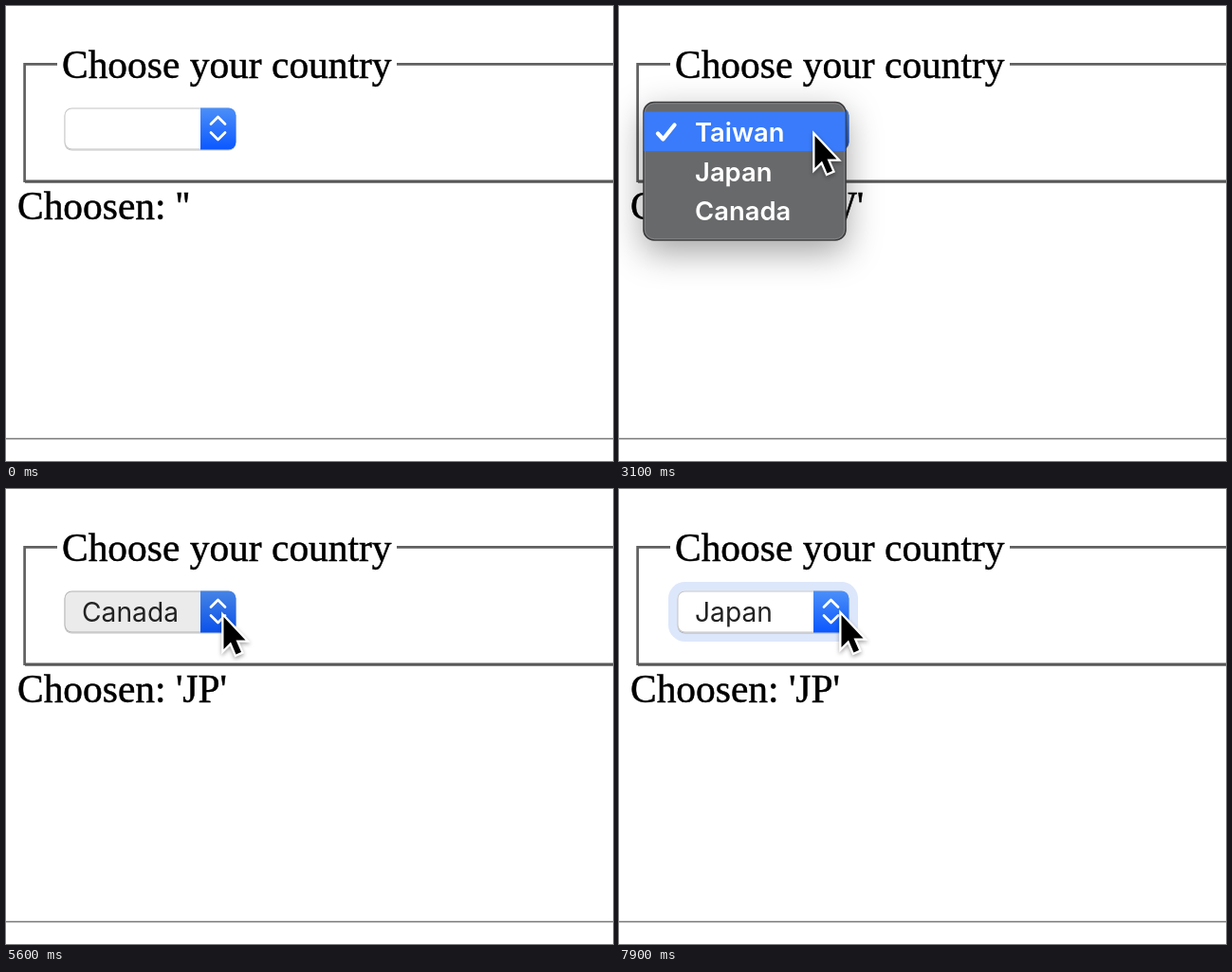
These frames come from a looping animation (640x480 px, 8000 ms). An HTML page:

```html
<!DOCTYPE html>
<html lang="en">
<head>
<meta charset="utf-8">
<title>Choose your country</title>
<style>
html, body { margin: 0; width: 100%; height: 100%; overflow: hidden; background: #fff; }
svg { display: block; width: 640px; height: 480px; }
.page { font: 41.45px "Liberation Serif", "Times New Roman", serif; }
.page text { stroke: #000; stroke-width: .5px; }
.ui { font: 28.2px Inter, "Open Sans", sans-serif; }
#menu { font-weight: 600; font-size: 27.4px; fill: #fff; filter: drop-shadow(0 12px 18px rgba(0, 0, 0, .36)); }
.line { fill: none; stroke-linecap: round; stroke-linejoin: round; }
</style>
</head>
<body>
<svg viewBox="0 0 640 480">
  <defs>
    <linearGradient id="blue" x1="0" y1="0" x2="0" y2="1">
      <stop offset="0" stop-color="#4d90f8"/>
      <stop offset="1" stop-color="#0a57ff"/>
    </linearGradient>
    <clipPath id="view"><rect y="24" width="640" height="456"/></clipPath>
    <clipPath id="box"><rect x="61.5" y="107.5" width="181" height="44" rx="8"/></clipPath>
  </defs>

  <g class="page">
    <path d="M54 61.3H19.6V186" fill="none" stroke="#606060" stroke-width="2.7"/>
    <path d="M412 61.3H640" stroke="#606060" stroke-width="2.7"/>
    <path d="M20 185.1H640" stroke="#585858" stroke-width="3.4"/>
    <path d="M0 456.5H640" stroke="#777" stroke-width="1.3"/>
    <text x="59" y="75.8">Choose your country</text>
    <text x="12" y="225.3" id="chosen"></text>
  </g>

  <g class="ui">
    <rect id="ring"/>
    <rect x="61.5" y="108.5" width="181" height="44" rx="8" fill="#000" opacity=".22"/>
    <g clip-path="url(#box)">
      <rect x="61" y="107" width="182" height="45" fill="#fff"/>
      <rect x="61.5" y="107.5" width="181" height="44" rx="8" fill="none" stroke="#c4c4c4" stroke-width="2"/>
      <rect x="205" y="107" width="38" height="45" fill="url(#blue)"/>
      <rect id="press" x="61" y="107" width="182" height="45" opacity=".08"/>
    </g>
    <path class="line" d="M216 124.5L223.5 117L231 124.5M216 133.5L223.5 141L231 133.5" stroke="#fff" stroke-width="2.7"/>
    <text x="80" y="139.5" id="value" fill="#222"></text>
  </g>

  <g clip-path="url(#view)">
    <g id="menu" class="ui">
      <rect x=".5" y=".5" width="213" height="145.5" rx="11" fill="#68696b" stroke="#3b3b3d" stroke-width="1.6"/>
      <rect x="1.8" y="1.8" width="210.4" height="142.9" rx="10" fill="none" stroke="#838486"/>
      <rect id="hover" x="1" width="212" height="41.5" fill="#397bfa"/>
      <path id="check" class="line" d="M15.5 33.5L21 39.5L33 24.5" stroke="#fff" stroke-width="4.3"/>
    </g>
  </g>

  <g id="cursor" style="filter: drop-shadow(0 2px 2px rgba(0, 0, 0, .35))">
    <path d="M2.5 6V40L10 32.5L15.5 45.5L21 43L15.5 30.5H25.5Z" fill="#000" stroke="#fff" stroke-width="4.6"
      stroke-linejoin="miter" paint-order="stroke"/>
  </g>
</svg>
<script>
const $ = id => document.getElementById(id);
const countries = ["Taiwan", "Japan", "Canada"], codes = ["TW", "JP", "CA"];
const ROW = 41.5, PAD = 10.6, LOOP = 8000, STEP = 100;
const FADE = 200, COMMIT = 300;

// Each visit to the menu: when it opens, when an item is clicked, which item.
const visits = [
  { open: 1300, click: 2200, pick: 0 },
  { open: 3000, click: 4000, pick: 1 },
  { open: 4500, click: 5400, pick: 2 },
  { open: 6200, click: 7600, pick: 1 }
];

// Pointer path: time, x, y
const path = [
  [400, 521, 274], [600, 420, 195], [800, 300, 120], [900, 245, 96], [1100, 200, 112],
  [1300, 212, 128], [1700, 198, 160], [2100, 204, 131], [3400, 204, 131], [3900, 190, 169],
  [4050, 192, 168], [4500, 224, 121], [4600, 224, 121], [5000, 198, 165], [5400, 194, 172],
  [5600, 227, 129], [6000, 225, 117], [6400, 225, 117], [7100, 198, 83], [7300, 200, 86],
  [7600, 201, 87], [7900, 232, 127]
];

countries.forEach((name, i) => {
  const label = document.createElementNS("http://www.w3.org/2000/svg", "text");
  label.setAttribute("x", 54.5);
  label.setAttribute("y", 42 + i * ROW);
  label.textContent = name;
  $("menu").append(label);
});

function set(id, attrs) {
  for (const k in attrs) $(id).setAttribute(k, attrs[k]);
}

function show(id, on) {
  $(id).style.display = on ? "" : "none";
}

function pointer(t) {
  const i = path.findIndex(p => p[0] > t);
  if (i < 0) return path[path.length - 1].slice(1);
  if (!i) return path[0].slice(1);
  const [t0, x0, y0] = path[i - 1], [t1, x1, y1] = path[i];
  const u = (t - t0) / (t1 - t0);
  return [x0 + (x1 - x0) * u, y0 + (y1 - y0) * u];
}

function draw(t) {
  const [x, y] = pointer(t);
  show("cursor", t >= path[0][0]);
  set("cursor", { transform: `translate(${x} ${y})` });

  const done = visits.filter(v => t >= v.click + COMMIT).pop();
  const closed = visits.filter(v => t >= v.click + FADE).pop();
  const busy = visits.find(v => t >= v.open && t < v.click + COMMIT);
  $("chosen").textContent = `Choosen: '${done ? codes[done.pick] : ""}'`;
  $("value").textContent = closed ? countries[closed.pick] : "";
  show("press", busy);

  show("ring", done && !busy);
  if (done) {
    const fresh = t < done.click + COMMIT + STEP, pad = fresh ? 9.5 : 6;
    set("ring", {
      x: 61.5 - pad, y: 107.5 - pad, width: 181 + 2 * pad, height: 44 + 2 * pad,
      rx: 8 + pad, fill: fresh ? "#dde7fb" : "#9dbff9"
    });
  }

  const open = busy && t < busy.click + FADE;
  show("menu", open);
  if (!open) return;
  const current = done ? done.pick : 0, top = 101 - current * ROW;
  const row = t >= busy.click ? busy.pick : Math.floor((y + 4 - top - PAD) / ROW);
  const u = Math.max(0, (t - busy.click) / FADE);
  set("menu", { transform: `translate(${done ? 25.5 : 28} ${top})`, opacity: 1 - u ** 1.5 });
  show("hover", row >= 0 && row < countries.length);
  set("hover", { y: PAD + row * ROW });
  show("check", done);
  set("check", { transform: `translate(0 ${current * ROW})` });
}

const start = performance.now();
function tick() {
  const t = (performance.now() - start) % LOOP;
  draw(Math.floor(t / STEP) * STEP);
  requestAnimationFrame(tick);
}
tick();
</script>
</body>
</html>
```
